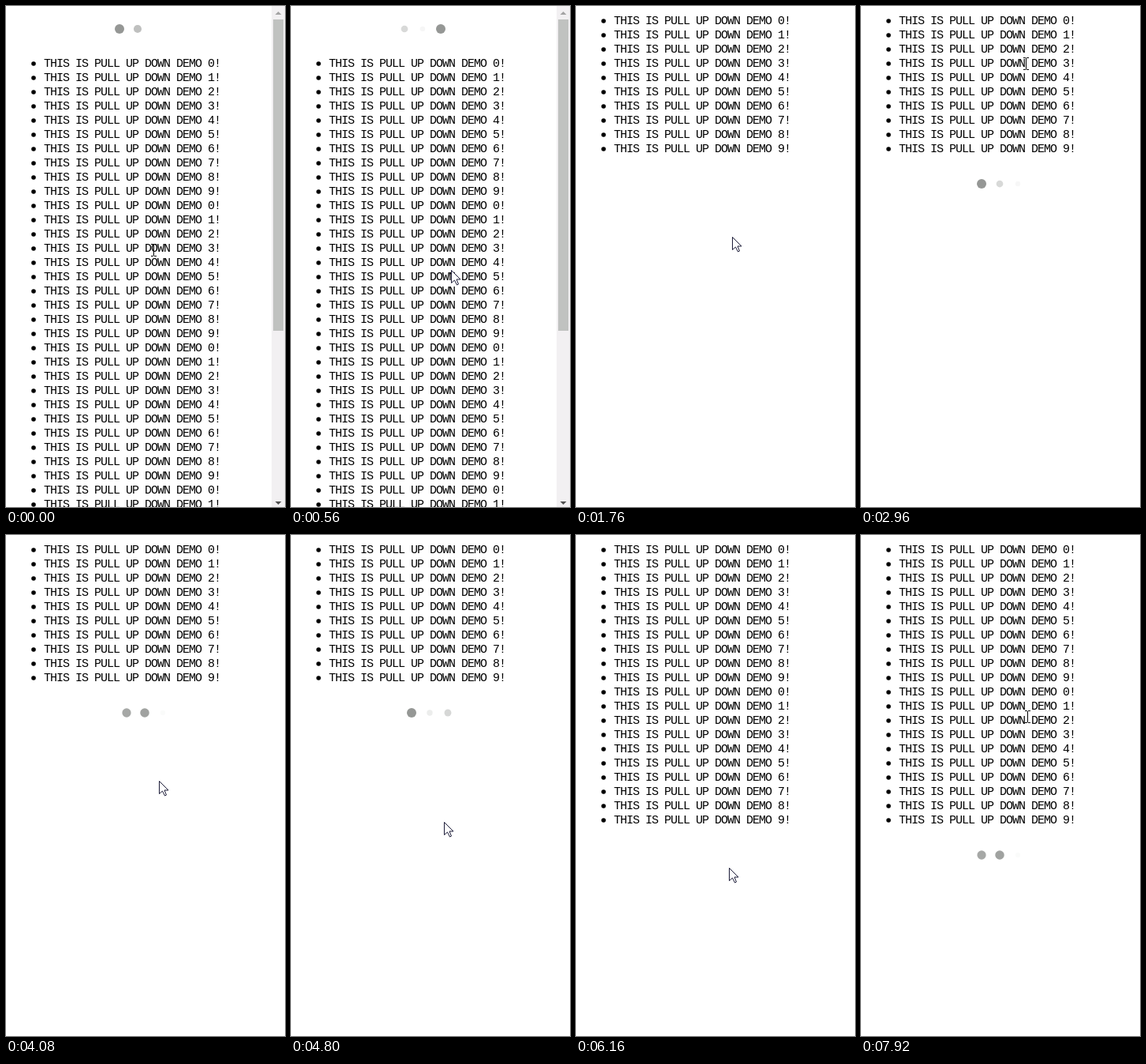
These frames come from a looping animation (354 px wide and 634 px high, 8 s). An HTML page with a canvas:

```html
<!DOCTYPE html>
<html lang="en">
<head>
<meta charset="utf-8">
<title>Pull up / down demo</title>
<style>
  html, body { margin: 0; width: 100%; height: 100%; overflow: hidden; background: #fff; }
  canvas { display: block; width: 354px; height: 634px; }
</style>
</head>
<body>
<canvas id="stage" width="354" height="634"></canvas>
<script>
const ctx = document.getElementById('stage').getContext('2d');
const LOOP = 8000, STEP = 80;
const REFRESHED = 1200, LOAD_1 = 2480, APPENDED = 6160, LOAD_2 = 7200;

// Pointer way points: time, x, y
const path = [
  [0, 187, 309], [80, 187, 309], [480, 203, 334], [1520, 203, 334],
  [2000, 192, 250], [2400, 209, 137], [2800, 209, 73], [3040, 209, 73],
  [3280, 209, 141], [3840, 195, 325], [4080, 194, 311], [4160, 194, 312],
  [5040, 194, 375], [5520, 194, 397], [6080, 194, 421], [6960, 194, 421],
  [7440, 205, 300], [7760, 211, 230], [LOOP, 211, 230]
];

const clamp = v => Math.max(0, Math.min(1, v));

function pointerAt(t) {
  const i = path.findIndex(p => p[0] > t);
  const [t0, x0, y0] = path[i - 1], [t1, x1, y1] = path[i];
  const k = (t - t0) / (t1 - t0);
  const e = k * k * (3 - 2 * k);
  return [Math.round(x0 + (x1 - x0) * e), Math.round(y0 + (y1 - y0) * e)];
}

function polygon(points, fill) {
  ctx.beginPath();
  points.forEach(([x, y]) => ctx.lineTo(x, y));
  ctx.closePath();
  ctx.fillStyle = fill;
  ctx.fill();
}

function disc(x, y, r, fill) {
  ctx.beginPath();
  ctx.arc(x, y, r, 0, 2 * Math.PI);
  ctx.fillStyle = fill;
  ctx.fill();
}

function drawList(top, count) {
  ctx.font = '15px "Liberation Mono", monospace';
  ctx.letterSpacing = '-1px';
  for (let i = 0; i < count; i++) {
    const y = top + 18 * i;
    disc(35, y + 10, 2.8, '#000');
    ctx.fillText(`THIS IS PULL UP DOWN DEMO ${i % 10}!`, 48, y + 14);
  }
}

function drawScrollbar() {
  ctx.fillStyle = '#f2f0f2';
  ctx.fillRect(337, 0, 17, 634);
  ctx.fillStyle = '#c0c2c0';
  ctx.fillRect(339, 17, 13, 394);
  polygon([[341.5, 11], [349.5, 11], [345.5, 7]], '#a3a3a3');
  polygon([[341.5, 627], [349.5, 627], [345.5, 631]], '#505050');
}

// Each dot swells, holds and fades, a third of a cycle after the one before.
function drawLoader(x, y, cycle) {
  for (let i = 0; i < 3; i++) {
    let u = cycle - i / 3;
    u -= Math.floor(u);
    if (u > 0.43) u -= 1;
    const level = u < 0 ? clamp((u + 0.54) / 0.42) : clamp((0.4 - u) / 0.24);
    ctx.globalAlpha = level ** 1.6;
    disc(x + 23 * i, y, 2.5 + 3.5 * level, '#959795');
  }
  ctx.globalAlpha = 1;
}

function drawArrow(x, y) {
  const shape = [[0, 0], [0, 16], [4, 12.5], [7, 18.5], [9, 17.5], [6.5, 11.5], [11.5, 11.5]];
  polygon(shape.map(([dx, dy]) => [x + 0.5 + dx, y + 0.5 + dy]), '#fff');
  ctx.strokeStyle = '#1c1c38';
  ctx.lineWidth = 1;
  ctx.stroke();
}

function drawBeam(x, y) {
  ctx.fillStyle = '#000';
  ctx.fillRect(x, y - 7, 1, 14);
  for (const edge of [y - 8, y + 7]) {
    ctx.fillRect(x - 3, edge, 3, 1);
    ctx.fillRect(x + 1, edge, 3, 1);
  }
}

function draw(t) {
  const full = t < REFRESHED;
  const top = full ? 63 : 9;
  const count = full ? 32 : t < APPENDED ? 10 : 20;
  ctx.fillStyle = '#fff';
  ctx.fillRect(0, 0, 354, 634);
  drawList(top, count);

  if (full) {
    drawScrollbar();
    drawLoader(144, 29, t / 960 + 0.1);
  } else if ((t >= LOAD_1 && t < APPENDED) || t >= LOAD_2) {
    drawLoader(153, top + 18 * count + 36, t / 960 - 0.065);
  }

  const [x, y] = pointerAt(t);
  const overText = y < top + 18 * count && (y - top) % 18 > 1;
  (overText ? drawBeam : drawArrow)(x, y);
}

function tick() {
  const t = performance.now() % LOOP;
  draw(Math.floor(t / STEP) * STEP);
  requestAnimationFrame(tick);
}
tick();
</script>
</body>
</html>
```
